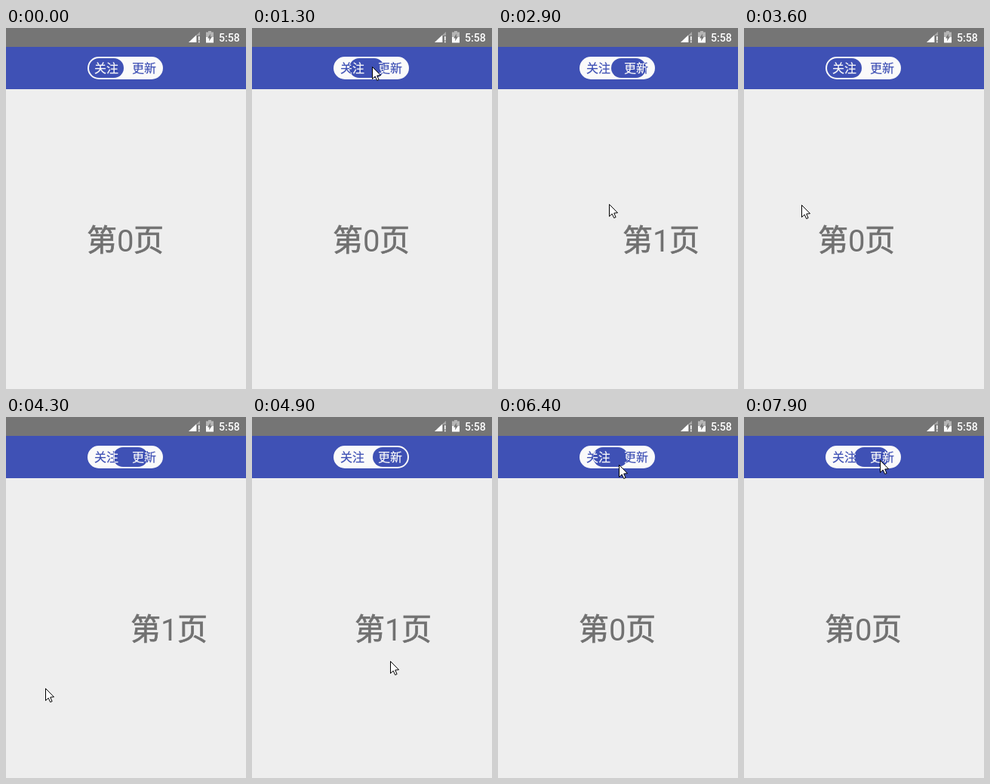
Write an HTML page with a canvas that moves like this. It is 318 px wide and 478 px high and loops after 8000 ms.

```html
<!DOCTYPE html>
<html lang="zh-CN">
<head>
<meta charset="utf-8">
<style>
html, body { margin: 0; width: 100%; height: 100%; overflow: hidden; background: #eee; }
canvas { display: block; }
</style>
</head>
<body>
<canvas id="stage" width="318" height="478"></canvas>
<script>
const ctx = document.getElementById('stage').getContext('2d');
const W = 318, H = 478, LOOP = 8000, STEP = 100;
const BLUE = '#3f51b5', PALE = '#fafafa';
const LATIN = 'Roboto, sans-serif';
const CJK = '"Noto Sans CJK SC", "Noto Sans CJK", sans-serif';

const LEFT = 110, RIGHT = 160, SLIDE = 340, SLIDE_LEAD = 100;

// Resting points of the hand: ms, x, y.
const stops = [
  [500, 309, 73], [900, 140, 51], [1000, 140, 51], [1300, 159, 51], [1400, 159, 51],
  [2000, 180, 54], [2100, 180, 54], [2700, 90, 232], [3200, 254, 234], [3600, 76, 234],
  [4300, 52, 359], [5000, 190, 321], [5300, 184, 98], [5900, 144, 63], [6400, 160, 63],
  [6700, 160, 63], [7500, 185, 59], [7600, 185, 59], [7900, 180, 57]
];

// The finger pulls the page a little, lets go, and the page settles on its own.
const flips = [
  { start: 1500, release: 1500, pull: 0, settle: 500, page: 1, thumbFrom: 129 },
  { start: 2700, release: 2900, pull: 58, settle: 250, page: 0, thumbFrom: RIGHT },
  { start: 3500, release: 4200, pull: 63, settle: 390, page: 1, thumbFrom: LEFT },
  { start: 4800, release: 5000, pull: 58, settle: 250, page: 0, thumbFrom: RIGHT }
];

const thumbDrags = [
  { start: 900, end: 1400, pressX: 140 },
  { start: 5900, end: LOOP, pressX: 144 }
];

const progress = (t, start, duration) => Math.min(1, Math.max(0, (t - start) / duration));
const easeInOut = p => (1 - Math.cos(Math.PI * p)) / 2;
const easeOut = p => 1 - (1 - p) ** 5;
const mix = (a, b, p) => a + (b - a) * p;

function pointerAt(t) {
  const i = Math.max(0, stops.findLastIndex(stop => stop[0] <= t));
  const [t0, x0, y0] = stops[i];
  const [t1, x1, y1] = stops[i + 1] || stops[i];
  const p = easeInOut(progress(t, t0, t1 - t0 || 1));
  return { x: Math.round(mix(x0, x1, p)), y: Math.round(mix(y0, y1, p)) };
}

function scrollAt(t) {
  const flip = flips.findLast(f => t >= f.start);
  if (!flip) return 0;
  const pulled = flip.pull * progress(t, flip.start, flip.release - flip.start || 1);
  const moved = mix(pulled, W, easeOut(progress(t, flip.release, flip.settle)));
  return Math.round(flip.page ? moved : W - moved);
}

function thumbAt(t, pointerX) {
  const drag = thumbDrags.find(d => t >= d.start && t < d.end);
  if (drag) return LEFT + pointerX - drag.pressX;
  const flip = flips.findLast(f => t >= f.release - SLIDE_LEAD);
  if (!flip) return LEFT;
  const p = easeInOut(progress(t, flip.release - SLIDE_LEAD, SLIDE));
  return Math.round(mix(flip.thumbFrom, flip.page ? RIGHT : LEFT, p));
}

function rect(x, y, w, h, color) {
  ctx.fillStyle = color;
  ctx.fillRect(x, y, w, h);
}

function pill(x, y, w, h, color) {
  ctx.beginPath();
  ctx.roundRect(x, y, w, h, h / 2);
  ctx.fillStyle = color;
  ctx.fill();
}

function polygon(points, color) {
  ctx.beginPath();
  points.forEach(([x, y]) => ctx.lineTo(x, y));
  ctx.closePath();
  ctx.fillStyle = color;
  ctx.fill();
}

function label(text, x, y, font, color, weight = 0) {
  ctx.font = font;
  ctx.fillStyle = ctx.strokeStyle = color;
  ctx.fillText(text, x, y);
  ctx.lineWidth = weight;
  if (weight) ctx.strokeText(text, x, y);
}

function drawStatusBar() {
  rect(0, 0, W, 25, '#757575');
  polygon([[242, 19], [257, 5], [257, 10], [253, 10], [253, 19]], '#a5a5a5');
  polygon([[242, 19], [252, 9.5], [252, 19]], '#fff');
  rect(255, 11, 1.6, 5.5, '#fff');
  rect(255, 17.5, 1.6, 1.8, '#fff');
  rect(268, 4, 4, 2, '#b5b5b5');
  rect(265, 5.5, 10, 7, '#b5b5b5');
  rect(265, 12, 10, 7.5, '#fff');
  polygon([[271, 7.5], [267, 13.5], [269.5, 13.5], [269, 17.5], [273, 11.5], [270.7, 11.5]], '#757575');
  label('5:58', 282, 18, '500 14px ' + LATIN, '#fff');
}

function drawTabs(color) {
  label('关注', 117, 59, '16px ' + CJK, color, 0.2);
  label('更新', 167, 59, '16px ' + CJK, color, 0.2);
}

function drawToggle(x) {
  pill(108, 38, 100, 30, PALE);
  drawTabs(BLUE);
  ctx.save();
  pill(x, 40, 46, 26, BLUE);
  ctx.clip();
  drawTabs(PALE);
  ctx.restore();
}

function drawPage(number, x) {
  const color = '#717171';
  label('第', x + 107, 295, '40px ' + CJK, color, 0.7);
  label(number, x + 147, 296, '40px ' + LATIN, color);
  label('页', x + 169, 295, '40px ' + CJK, color, 0.7);
}

function drawPointer({ x, y }) {
  ctx.save();
  ctx.translate(x + 0.5, y + 0.5);
  polygon([[0, 0], [0, 16], [3.7, 12.6], [6.2, 18], [8.6, 17], [6.2, 11.6], [11, 11.2]], '#fff');
  ctx.strokeStyle = '#000';
  ctx.lineWidth = 1;
  ctx.stroke();
  ctx.restore();
}

function draw(t) {
  const pointer = pointerAt(t), scroll = scrollAt(t);
  rect(0, 0, W, H, '#eee');
  drawPage(0, -scroll);
  drawPage(1, W - scroll);
  rect(0, 25, W, 56, BLUE);
  drawStatusBar();
  drawToggle(thumbAt(t, pointer.x));
  if (t >= stops[0][0]) drawPointer(pointer);
}

function tick() {
  const t = performance.now() % LOOP;
  draw(Math.floor(t / STEP) * STEP);
  requestAnimationFrame(tick);
}
tick();
</script>
</body>
</html>
```
